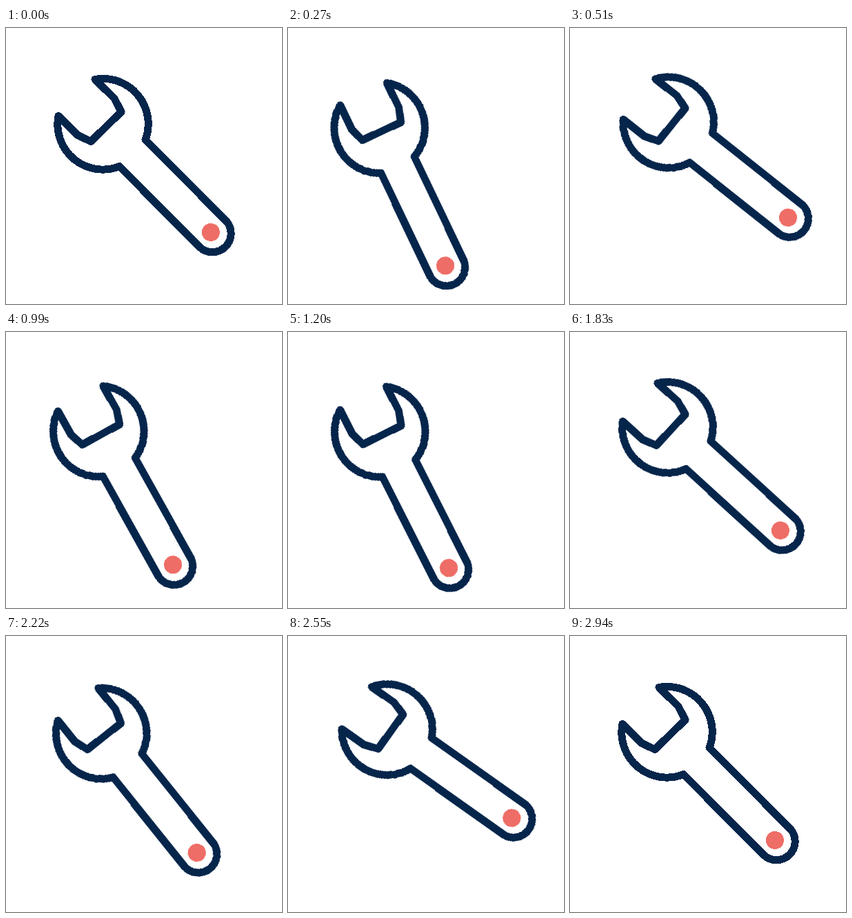
An HTML page for the animation above (4970 ms loop, 400x400 px).

```html
<!DOCTYPE html>
<html lang="en">
<head>
<meta charset="utf-8">
<title>Wrench</title>
<style>
  html, body { margin: 0; width: 100%; height: 100%; overflow: hidden; background: #fff; }
  svg { display: block; width: 100%; height: 100%; shape-rendering: crispEdges; }

  .wrench {
    transform-origin: 121px 119px;
    animation: swing 4970ms ease infinite;
  }
  .outline {
    fill: none;
    stroke: #06254b;
    stroke-width: 11;
    stroke-linejoin: round;
  }
  .hole { fill: #ee6d66; }

  /* three turns of the bolt, then a long rest */
  @keyframes swing {
    0% { transform: rotate(0deg); }
    4.53% { transform: rotate(22.4deg); }
    13.98% { transform: rotate(-10.1deg); }
    16.9% { transform: rotate(-10.5deg); }
    23% { transform: rotate(22.4deg); }
    32.6% { transform: rotate(-10.1deg); }
    35.7% { transform: rotate(-10.5deg); }
    42.23% { transform: rotate(22.4deg); }
    50.7% { transform: rotate(-10.3deg); }
    59.4%, 100% { transform: rotate(0deg); }
  }
</style>
</head>
<body>
<svg viewBox="0 0 400 400" aria-label="Turning wrench">
  <g class="wrench">
    <path class="outline" d="M129 74.5
      A65.5 65.5 0 0 1 202 162
      L318.3 278.6
      A27 27 0 0 1 280.1 316.8
      L164.5 200.5
      A65.5 65.5 0 0 1 76 127.5
      L103.5 155 L123 164.5 L167 121.5 L157 102 Z"/>
    <circle class="hole" cx="297" cy="296" r="13"/>
  </g>
</svg>
</body>
</html>
```
